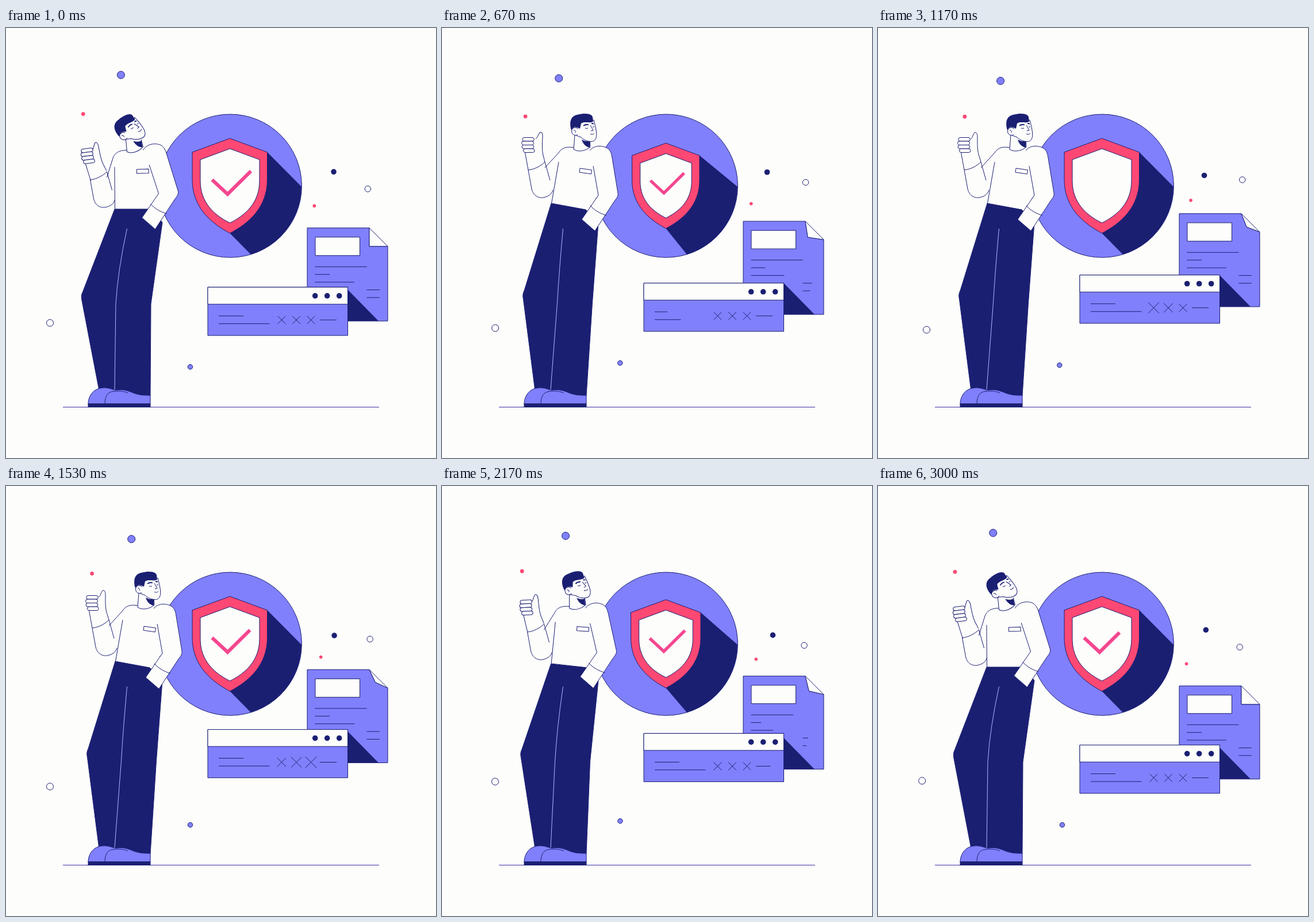
Animation, 748 px wide and 748 px high, one loop 3030 ms. Source, as an HTML page:

```html
<!DOCTYPE html>
<html lang="en">
<head>
<meta charset="utf-8">
<title>Security illustration</title>
<style>
  html, body { margin: 0; width: 100%; height: 100%; overflow: hidden; background: #fdfdfc; }
  svg { display: block; width: 100vw; height: 100vh; }
  .line { fill: none; stroke: #1b1f72; }
  .white { fill: #fdfdfc; stroke: #1b1f72; }
  .blue { fill: #8080fc; stroke: #1b1f72; }
  .navy { fill: #1b1f72; stroke: none; }
  .plain { fill: #fdfdfc; stroke: none; }
  .seam { fill: none; stroke: #b4b4ff; }
  .pink { fill: #fd4874; }
  #rim path, #plate path { vector-effect: non-scaling-stroke; }
  #plate #check { vector-effect: none; }
</style>
</head>
<body>
<svg viewBox="0 0 748 748" stroke-linejoin="round">
  <path d="M99 659.5H649" stroke="#3a30a0"/>

  <circle class="blue" cx="389.8" cy="274.6" r="124.6"/>
  <path id="shade" class="navy"/>
  <g id="rim">
    <path class="pink" stroke="#1b1f72" d="M389.5 192L454.5 216V264C454.5 312 422 340 389.5 357C357 340 324 312 324 264V216Z"/>
  </g>
  <g id="plate">
    <path class="white" d="M389.5 210L441 229V266C441 304 416 326 389.5 339C363 326 338 304 338 266V229Z"/>
    <path id="check" d="M358.5 264L385.5 289L426 249" fill="none" stroke="#f4478f" stroke-width="6" stroke-linejoin="miter" pathLength="100"/>
  </g>

  <g id="doc">
    <path id="sheet" class="blue"/>
    <path id="fold" class="white"/>
    <path class="white" d="M538 16H615.5V48H538Z"/>
    <path class="navy" d="M594 107L648 162H594Z"/>
    <path id="docLines" class="line"/>
  </g>
  <g id="win">
    <path class="blue" d="M351 0H594.5V84H351Z"/>
    <path class="white" d="M351 0H594.5V29.5H351Z"/>
    <g class="navy"><circle cx="537.7" cy="15" r="4.8"/><circle cx="558.7" cy="15" r="4.8"/><circle cx="579.7" cy="15" r="4.8"/></g>
    <path id="winLines" class="line"/>
  </g>

  <path id="pants" class="navy" style="stroke:#1b1f72"/>
  <path id="seam" class="seam"/>
  <path class="blue" d="M143 654C143 640 152 627 168 626C178 625 185 629 191 630C205 628 212 631 222 635C232 639 242 639 251 639V654Z"/>
  <path class="line" d="M172 654C172 641 176 633 188 632C198 631 206 632 212 635"/>
  <path class="navy" d="M142.5 653H251.5V660H142.5Z"/>

  <g id="torso">
    <path class="plain" d="M229 208C212 205 206 212 203 217V233L190 305L251 316L272 291L296 226L289 210L258 208Z"/>
    <path class="line" d="M203 233L190.5 305L250 316"/>
    <path class="white" d="M240 244L260.5 247L259.500 254L239 251Z"/>
    <path class="white" d="M231 186L229 211C238 217 251 213 258 207L257 194"/>
    <path class="navy" d="M243 194C248 197 253 198 257 196V208C250 207 245 201 243 194Z"/>
    <g id="head">
      <path class="white" d="M264 160L267 172L268.500 181C270 192 266 198 259 197.500C251 197 246 194 242 190L231 186L234 165Z"/>
      <path class="navy" d="M224 175C221 160 226 152 237 150.500C246 148 261 148 262 155L263 163C256 166 248 162 242 166L240 175L235 173C230 171 227 174 226 179Z"/>
      <path class="white" d="M237 176C235 172 225 172 225.500 180C226 187 234 188 236 185"/>
      <path class="line" d="M229 178C232 177 233 180 232 182M258 169L263 178L259 179M258 184C261 186 264 185 265 183M249 174Q251 176 254 174M262 172H265"/>
      <path class="line" stroke-width="1.8" d="M246 170Q250 167 255 168.500M260 166L264 166.500"/>
    </g>
  </g>

  <path id="rightArm" class="white"/>
  <path id="rightCuff" class="line"/>
  <path id="leftShoulder" class="line"/>
  <g id="leftArm">
    <path class="line" d="M150 247L156 280C159 293 169 296 176 295C185 293 190 290 193 282M179 233L188 265M150 247C161 246 172 240 179 233"/>
    <g id="hand">
      <path class="line" d="M144 214L150 247"/>
      <path id="thumb" class="line" d="M161 193C164 193 165 185 168 182C171 180 173 184 173 190C173 200 172 214 177 226L179 233"/>
      <g id="fingers" class="white"></g>
    </g>
  </g>
  <g id="dots"></g>
</svg>
<script>
const LOOP = 3030;
const $ = id => document.getElementById(id);
const set = (id, name, value) => $(id).setAttribute(name, value);
const clamp = x => Math.min(1, Math.max(0, x));
const ramp = (t, a, b) => clamp((t - a) / (b - a));
const smooth = x => x * x * (3 - 2 * x);
const rad = degrees => degrees * Math.PI / 180;
const bump = (t, center, half) =>
  Math.abs(t - center) < half ? Math.cos((t - center) / half * Math.PI / 2) ** 2 : 0;
// Endless swing around a middle, highest at the peak angle of the loop.
const swing = (t, mid, reach, peak = 0, rate = 1) =>
  mid + reach * Math.cos(rad(t / LOOP * 360 * rate - peak));

function add(parent, tag, attrs) {
  const el = document.createElementNS('http://www.w3.org/2000/svg', tag);
  for (const key in attrs) el.setAttribute(key, attrs[key]);
  return $(parent).appendChild(el);
}

for (let i = 0; i < 4; i++) {
  const inset = (i - 1.2) ** 2 * 0.9;
  add('fingers', 'rect', { x: 138.5 + inset, y: 190.5 + 6.5 * i, width: 21 - inset / 2, height: 6.5, rx: 3.2 });
}

// Each axis: middle, reach, peak angle, swings per loop.
const dots = [
  { look: 'blue', r: 6.5, x: [209, 10, 205], y: [87, 5.5, 165] },
  { look: 'pink', r: 3.4, x: [142, 9, 150], y: [151, 3.5, 115] },
  { look: 'navy', r: 4.8, x: [570.5, 5, 265], y: [255, 6, 215] },
  { look: 'white', r: 5.2, x: [631.3, 2.5, 140], y: [273, 9, 320] },
  { look: 'pink', r: 2.8, x: [542, 6.5, 210], y: [303.5, 6, 10] },
  { look: 'white', r: 6, x: [85, 8.5, 185, 2], y: [518, 7, 135] },
  { look: 'blue', r: 4.2, x: [315, 5.5, 0, 2], y: [586, 3.5, 0, 2] }
];
for (const dot of dots) dot.el = add('dots', 'circle', { class: dot.look, r: dot.r });

// Moves every "x y" pair of a path.
const place = (path, move) =>
  path.replace(/([\d.]+) ([\d.]+)/g, (_, x, y) => move(+x, +y).map(n => n.toFixed(2)).join(' '));

function drawFigure(t) {
  const lean = 1 - smooth(ramp(t, 80, 620)) + smooth(ramp(t, 1870, 2550));
  const tilt = -10.3 * lean, cos = Math.cos(rad(tilt)), sin = Math.sin(rad(tilt));
  const torso = (x, y) => [
    190 - lean + (x - 190) * cos - (y - 305) * sin,
    305 + 10 * lean + (x - 190) * sin + (y - 305) * cos
  ];
  const rightForearm = (x, y) => [x - 6.5 * lean, y - 3 * lean];
  const leftForearm = (x, y) => [x - 3.5 * lean, y + 17 * lean];
  const knee = (x, y) => [x - 9.5 * lean, y + 2 * lean];

  set('torso', 'transform', `translate(${-lean} ${10 * lean}) rotate(${tilt} 190 305)`);
  set('head', 'transform', `rotate(${-16.5 * lean} 240 195)`);

  set('pants', 'd', place('M190 305L250 316', torso) + 'L272 338' + place('L261.5 478', knee)
    + 'L251 640C225 640 210 631 189 631L161.5 628' + place('L141.5 472C140 465 141 461 143 457', knee) + 'Z');
  set('seam', 'd', 'M210.5 349' + place('Q204 420 200.5 478', knee) + 'L189 629');

  set('rightArm', 'd', place('M257 213C265 203 281 204 289 210C294 214 295 220 296 226', torso)
    + place('L306 287C307 293 303 297 300 301L266 353L243 333L272 291', rightForearm)
    + place('L263 240', torso));
  set('rightCuff', 'd', place('M258 309C266 318 276 323 286 326', rightForearm));
  set('leftShoulder', 'd', place('M229 208C212 205 206 212 203 217', torso) + place('L179 243', leftForearm));

  const flex = 4.5 * (bump(t, 340, 800) + bump(t, LOOP + 340, 800));
  set('leftArm', 'transform', `translate(${leftForearm(0, 0)})`);
  set('hand', 'transform', `rotate(${-7 * lean} 164.5 240)`);
  set('thumb', 'transform', `rotate(${flex - 6 * lean} 177 230)`);
}

function drawShield(t) {
  const pulse = 0.1 * (bump(t, 680, 290) + bump(t, 2280, 290));
  const k = 1 - pulse;
  const scaled = scale => `translate(389.5 274.5) scale(${scale}) translate(-389.5 -274.5)`;
  set('rim', 'transform', scaled(k));
  set('plate', 'transform', scaled(1 - 1.32 * pulse));
  set('shade', 'd', `M${389.5 + 65 * k} ${274.5 - 58.5 * k}L514 276`
    + `A124.6 124.6 0 0 1 426 394L389.5 ${274.5 + 82.5 * k}Z`);
  const drawn = t < 1090 ? 1 : t < 1540 ? ramp(t, 1180, 1540) : t < 2600 ? 1 : ramp(t, 2650, 3035);
  set('check', 'stroke-dasharray', `${drawn * 100} 200`);
  $('check').style.visibility = drawn > 0 ? 'visible' : 'hidden';
}

const dash = (x, y, length, k) => k > 0.01 ? `M${x} ${y}h${length * k}` : '';
// Retracts from a to b, then grows again from b to c.
const redraw = (t, a, b, c) => 1 - ramp(t, a, b) + ramp(t, b, c);

function drawDoc(t) {
  const k = swing(t, 0.5, -0.5), corner = `${632 + 10.5 * k} ${32 - 10 * k}`;
  set('doc', 'transform', `translate(0 ${swing(t, 333.6, 14.2)})`);
  set('sheet', 'd', `M524 0H632L${corner}L664 32V162H524Z`);
  set('fold', 'd', `M632 0L${corner}L664 32Z`);
  const start = t < 1515 ? 206 : 1826;
  const lines = [90, 25.5, 68.5, 22.5, 22.5].map((length, i) => {
    const s = start + 55 * i;
    return dash(i < 3 ? 537.5 : 627.5, 67.5 + 13.4 * i, length, redraw(t, s - 200, s, s + 420));
  });
  set('docLines', 'd', lines.join(''));
}

function drawWindow(t) {
  set('win', 'transform', `translate(0 ${swing(t, 437.3, 14.2, 17)})`);
  const first = t < 1515;
  const row = first ? redraw(t, 250, 450, 880) : redraw(t, 1600, 1750, 2130);
  const tail = first ? redraw(t, 750, 900, 1150) : redraw(t, 1800, 1950, 2205);
  const crosses = [0, 1, 2].map(i => {
    const r = 6.8 + 3.3 * bump(t, 1290 + 100 * i, 370);
    return `M${479.5 + 25.5 * i - r} ${57 - r}l${2 * r} ${2 * r}m0 ${-2 * r}l${-2 * r} ${2 * r}`;
  });
  set('winLines', 'd',
    dash(370, 50, 43, row) + dash(370, 63.5, 88.5, row) + crosses.join('') + dash(546, 57, 29, tail));
}

function draw(t) {
  drawShield(t);
  drawDoc(t);
  drawWindow(t);
  drawFigure(t);
  for (const { el, x, y } of dots) {
    el.setAttribute('cx', swing(t, ...x));
    el.setAttribute('cy', swing(t, ...y));
  }
}

const begin = performance.now();
function tick() {
  draw((performance.now() - begin) % LOOP);
  requestAnimationFrame(tick);
}
tick();
</script>
</body>
</html>
```
